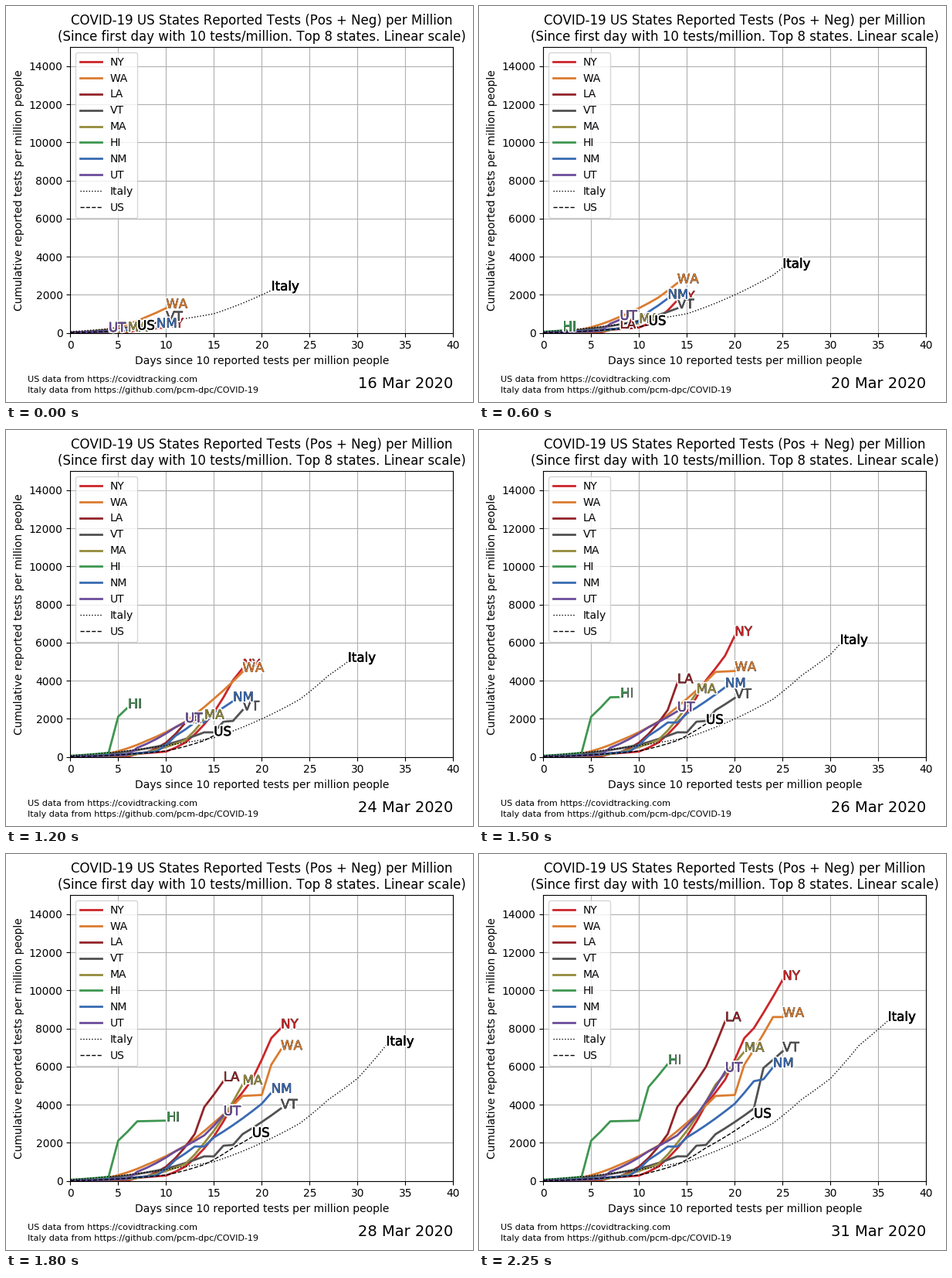
These frames come from a looping animation (605 by 512 pixels, 4.8 s). A matplotlib script:

```python
import matplotlib.pyplot as plt
import numpy as np
from matplotlib.animation import FuncAnimation
from matplotlib.patheffects import Normal, Stroke

WIDTH, HEIGHT, DPI = 605, 512, 100
FIRST_DATE, LAST_DATE = 16, 31
FRAMES, INTERVAL = 32, 150
LABEL_EFFECTS = [Stroke(linewidth=3, foreground="white"),
                 Stroke(linewidth=0.4, foreground="black"), Normal()]

plt.rcParams["font.family"] = "DejaVu Sans"
plt.rcParams["text.kerning_factor"] = 6  # whole-pixel glyph advances
fig = plt.figure(figsize=(WIDTH / DPI, HEIGHT / DPI), dpi=DPI, facecolor="white")
ax = fig.add_axes([83.3 / WIDTH, 89.3 / HEIGHT, 496 / WIDTH, 369.6 / HEIGHT])

series = []


def quadratic_growth(knots):
    """Daily values through {day: value} knots, with linear square roots."""
    days = np.arange(max(knots) + 1)
    return np.interp(days, list(knots), np.sqrt(list(knots.values()))) ** 2


def add_series(name, color, knots, style="-", width=2):
    """Register a curve whose last knot falls on the last date."""
    line, = ax.plot([], [], style, color=color, lw=width, label=name)
    label = ax.text(0, 0, name, color=color, fontsize=12,
                    path_effects=LABEL_EFFECTS)
    series.append((line, label, quadratic_growth(knots)))


def note(x, y, text, size, align="left"):
    return fig.text(x / WIDTH, 1 - y / HEIGHT, text, fontsize=size, ha=align)


# Turning points of cumulative tests per million, by day
add_series("NY", "#cc2529", {6: 16, 7: 165, 10: 282, 12: 750, 15: 2336,
                             17: 4024, 19: 5319, 21: 7492, 22: 8016, 25: 10547})
add_series("WA", "#da7c30", {0: 20, 4: 180, 8: 850, 12: 1850, 15: 3050,
                             18: 4460, 20: 4510, 21: 6100, 24: 8600, 25: 8600})
add_series("LA", "#922428", {0: 10, 8: 240, 10: 745, 13: 2463, 14: 3878,
                             17: 5995, 19: 8382})
add_series("VT", "#535154", {0: 20, 10: 640, 14: 1290, 15: 1290, 16: 1850,
                             17: 1890, 18: 2455, 22: 3800, 23: 5925, 25: 6800})
add_series("MA", "#948b3d", {0: 10, 6: 80, 12: 886, 14: 1995, 18: 5060,
                             21: 6780})
add_series("HI", "#3e9651", {0: 60, 4: 215, 5: 2110, 7: 3130, 10: 3165,
                             11: 4930, 13: 6140})
add_series("NM", "#396ab1", {0: 15, 9: 280, 11: 1110, 13: 1805, 14: 1805,
                             15: 2280, 20: 4050, 22: 5235, 23: 5335, 24: 5965})
add_series("UT", "#6b4c9a", {0: 12, 6: 110, 7: 480, 11: 1560, 14: 2395,
                             16: 3450, 19: 5740})
add_series("Italy", "black", {0: 72, 10: 602, 15: 1007, 24: 3028, 27: 4281,
                              30: 5375, 33: 7116, 36: 8399}, ":", 1)
add_series("US", "black", {0: 10, 10: 310, 14: 860, 17: 1740, 22: 3320}, "--", 1)

ax.set(xlim=(0, 40), ylim=(0, 15000),
       xlabel="Days since 10 reported tests per million people",
       ylabel="Cumulative reported tests per million people")
ax.set_title("COVID-19 US States Reported Tests (Pos + Neg) per Million\n"
             "(Since first day with 10 tests/million. Top 8 states. Linear scale)")
ax.grid(True)
ax.legend(loc="upper left")
note(27.5, 486.5, "US data from https://covidtracking.com", 8)
note(27.5, 500.5, "Italy data from https://github.com/pcm-dpc/COVID-19", 8)
date_text = note(579.3, 494, "", 14, "right")


def draw(frame):
    date = min(FIRST_DATE + frame, LAST_DATE)
    for line, label, values in series:
        shown = values[:max(0, len(values) - LAST_DATE + date)]
        line.set_data(range(len(shown)), shown)
        label.set_visible(len(shown) > 0)
        if len(shown):
            label.set_position((len(shown) - 1, shown[-1]))
    date_text.set_text(f"{date} Mar 2020")
    return []


anim = FuncAnimation(fig, draw, frames=FRAMES, interval=INTERVAL,
                     init_func=lambda: draw(0), repeat=True, repeat_delay=0)
plt.show()
```
